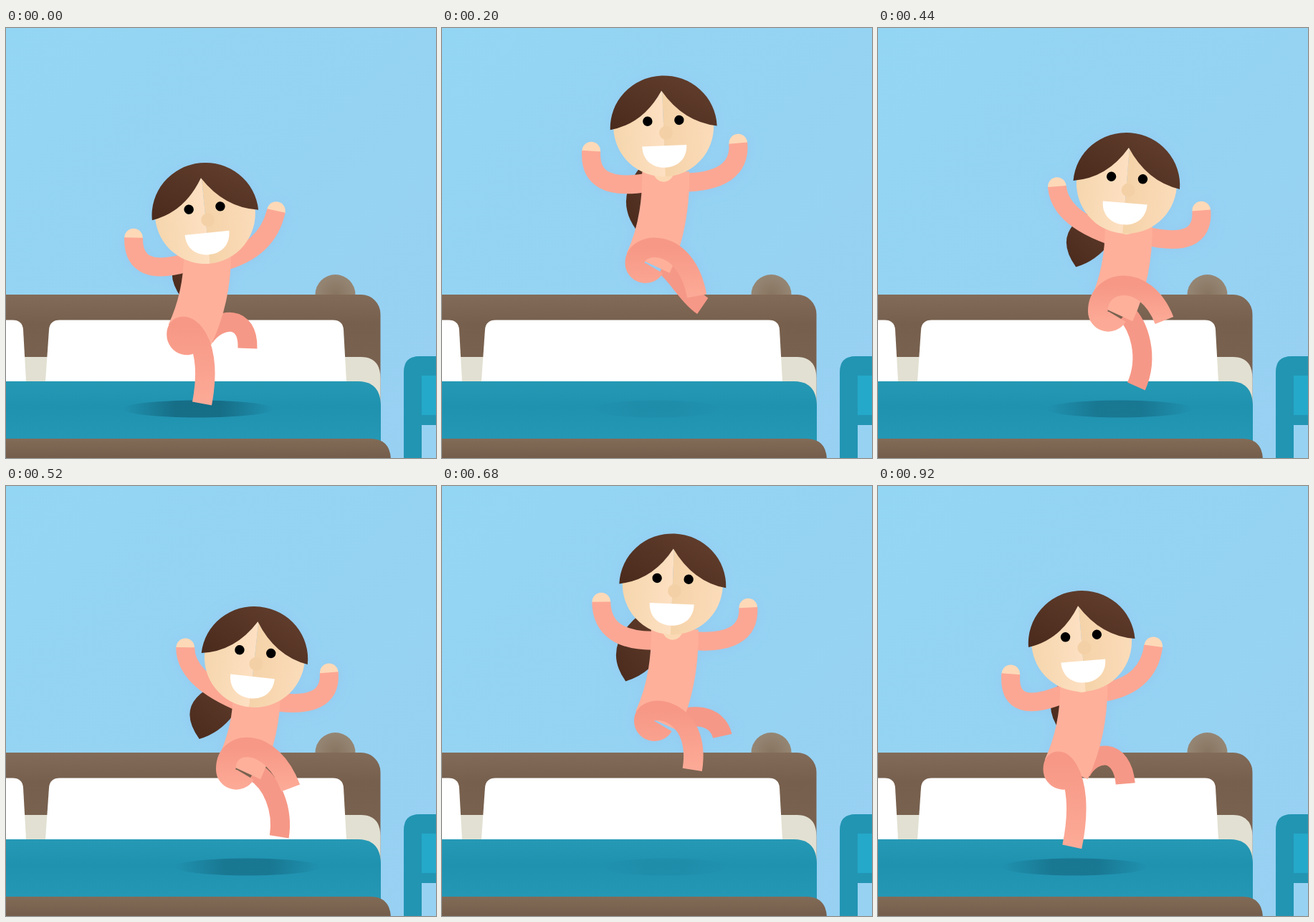
Recreate the animation shown at these times as an HTML page. Size 600 by 600 pixels, loop 960 ms.

```html
<!DOCTYPE html>
<html lang="en">
<head>
<meta charset="utf-8">
<title>Jumping on the bed</title>
<style>
  html, body { margin: 0; width: 100%; height: 100%; overflow: hidden; background: #94d5f2; }
  svg { display: block; width: 100vw; height: 100vh; }
</style>
</head>
<body>
<svg viewBox="0 0 600 600">
  <defs>
    <linearGradient id="sky" x2="1" y2="1">
      <stop stop-color="#93d6f3"/><stop offset="1" stop-color="#98d0f2"/>
    </linearGradient>
    <linearGradient id="wood" x2="0" y2="1">
      <stop stop-color="#826b58"/><stop offset=".18" stop-color="#765f4d"/><stop offset="1" stop-color="#806855"/>
    </linearGradient>
    <linearGradient id="foot" x2="0" y2="1">
      <stop stop-color="#826b56"/><stop offset="1" stop-color="#735c4a"/>
    </linearGradient>
    <radialGradient id="knob">
      <stop stop-color="#887460"/><stop offset="1" stop-color="#958674"/>
    </radialGradient>
    <linearGradient id="quilt" x2="0" y2="1">
      <stop stop-color="#2699b5"/><stop offset=".4" stop-color="#1f92b0"/><stop offset="1" stop-color="#2598b5"/>
    </linearGradient>
    <linearGradient id="shade">
      <stop stop-color="#14657d" stop-opacity="0"/><stop offset=".35" stop-color="#14657d"/>
      <stop offset=".65" stop-color="#14657d"/><stop offset="1" stop-color="#14657d" stop-opacity="0"/>
    </linearGradient>
    <linearGradient id="hair" x1="0" y1="1" x2="1" y2="0">
      <stop stop-color="#4a2a1c"/><stop offset="1" stop-color="#64402f"/>
    </linearGradient>
    <linearGradient id="cheekL">
      <stop stop-color="#f5d6ad"/><stop offset="1" stop-color="#fde0c2"/>
    </linearGradient>
    <linearGradient id="cheekR">
      <stop stop-color="#f5d3a9"/><stop offset="1" stop-color="#fbdcba"/>
    </linearGradient>
    <linearGradient id="thigh" x2="0" y2="1">
      <stop stop-color="#f79886"/><stop offset="1" stop-color="#fcaa97"/>
    </linearGradient>
    <filter id="halo" x="-30%" y="-30%" width="160%" height="160%">
      <feGaussianBlur in="SourceAlpha" stdDeviation="10" result="b"/>
      <feFlood flood-color="#8fb8f0" flood-opacity=".35"/>
      <feComposite in2="b" operator="in"/>
    </filter>
  </defs>

  <rect width="600" height="600" fill="url(#sky)"/>
  <use href="#kid" filter="url(#halo)"/>

  <g id="nightstand">
    <path d="M555 600V480Q555 458 577 458H600V600Z" fill="#2295b3"/>
    <path d="M580 485H600V540H580Z" fill="#24a9ca"/>
    <path d="M580 554H600V600H580Z" fill="#98d2f2"/>
  </g>

  <g id="bed">
    <circle cx="459.5" cy="372" r="28" fill="url(#knob)"/>
    <rect x="-40" y="372" width="562.5" height="230" rx="27" fill="url(#wood)"/>
    <path d="M0 459H495Q522 459 522.5 488V530H0Z" fill="#e2e0d2"/>
    <path d="M55 493L60 421Q61 407.500 75 407.500H456Q470 407.500 471 421L475 493Z" fill="#fff"/>
    <path d="M0 407.500H9Q23 407.500 24 421L28 493H0Z" fill="#fff"/>
    <path d="M0 493H491Q522 493 523 526V580H0Z" fill="url(#quilt)"/>
    <path d="M0 573H508Q536 573 537 602H0Z" fill="url(#foot)"/>
  </g>

  <ellipse id="shadow" cy="531.5" ry="12" fill="url(#shade)"/>

  <g id="kid" fill="none">
    <path id="tail" fill="url(#hair)"/>
    <path id="backLeg" stroke="#f69887" stroke-width="27"/>
    <circle id="handL" r="12.800" fill="#fdd9b8"/>
    <circle id="handR" r="12.800" fill="#fdd9b8"/>
    <path id="armL" stroke="#fca794" stroke-width="26"/>
    <path id="armR" stroke="#fca794" stroke-width="26"/>
    <path id="torso" stroke="#feb09b" stroke-width="66"/>
    <circle id="neck" r="14" fill="#fbd9b4"/>
    <path id="frontLeg" stroke="url(#thigh)" stroke-width="27.500"/>
    <g id="head">
      <path d="M0 -72A70 70 0 0 0 0 68Z" fill="url(#cheekL)"/>
      <path d="M0 -72A70 70 0 0 1 0 68Z" fill="url(#cheekR)"/>
      <circle cx="3" cy="7" r="9.500" fill="#f4d0a6"/>
      <path d="M-74.500 0A74.500 73 0 0 1 74.500 0Q28 -7 -1 -52Q-28 -7 -74.500 0Z" fill="url(#hair)"/>
      <circle cx="-22" cy="-10" r="6.700" fill="#000"/>
      <circle cx="22" cy="-10" r="6.700" fill="#000"/>
      <path d="M-31 25H31C31 45 17 55.500 0 55.500S-31 45 -31 25Z" fill="#fff"/>
    </g>
  </g>
</svg>
<script>
const LOOP = 960, HOP = LOOP / 2, STEP = 40;
const poseTimes = [0, 200, 360, 520, 680, 840, 920];
const hopTimes = [0, 40, 200, 360, 440];

// Offsets from the hip: front leg [bend y, knee x, y, foot x, y]
const frontLeg = [
  [-28, 41, -8, 21, 96], [-30, 56, -40, 72, 46], [-41, 55, -61, 77, 9], [-43, 49, -47, 76, 26],
  [-29, 67, -19, 53, 68], [-29, 34, 1, 11, 105], [-30, 35, -2, 12, 108]
];
// Back leg [thigh x, y, knee x, y, foot x, y]
const backLeg = [
  [46, -26, 86, -28, 84.5, 19], [40, 10, 58, 45, 80, 60], [35, 16, 53, 60, 29, 101], [50, 18, 66, 55, 60, 94],
  [50, -12, 88, -10, 95, 21], [45, -32, 83, -32, 85.5, 14.5], [42, -28, 82, -31, 86.5, 20]
];
// Offsets from the collar: arms [elbow x, y, wrist x, y]
const armL = [
  [-101, 39, -100, -19], [-105, 29, -101, -29], [-92, 4, -98, -42], [-97, -17, -96.5, -60],
  [-98.5, 17, -99.5, -39], [-106, 46, -100.5, -16], [-103.5, 49, -99, -12]
];
const armR = [
  [87, -2, 99, -56.5], [108.5, 15, 104, -40], [110, 40, 105, -18], [108, 29, 104, -25],
  [108.5, 23, 105.5, -31], [96.5, 7, 102, -45], [92.5, 6, 100, -51]
];
// Ponytail tip, from the head centre
const tailTip = [[-33, 116], [-39, 141], [-60, 122], [-77, 112], [-65.5, 133], [-39.5, 129], [-30, 123]];
const tilt = [-5.6, -2.3, 2, 6.2, 2.3, -2.3, -4.6];
const headLift = [-167, -154.4, -188.5, -195.4, -176.4];

const el = id => document.getElementById(id);
const draw = (id, d) => el(id).setAttribute('d', d);
const attrs = (id, o) => { for (const k in o) el(id).setAttribute(k, o[k]); };

// Smooth periodic curve through values at uneven times
function spline(times, vals, period, t) {
  const n = times.length;
  const time = i => times[(i + n) % n] + Math.floor(i / n) * period;
  const val = i => vals[(i + n) % n];
  const slope = i => (val(i + 1) - val(i - 1)) / (time(i + 1) - time(i - 1));
  let i = n - 1;
  while (times[i] > t) i--;
  const h = time(i + 1) - time(i), u = (t - time(i)) / h, v = 1 - u;
  return v * v * (1 + 2 * u) * val(i) + u * u * (3 - 2 * u) * val(i + 1)
    + h * u * v * (v * slope(i) - u * slope(i + 1));
}
const pose = (rows, t) => rows[0].map((_, k) => spline(poseTimes, rows.map(r => r[k]), LOOP, t));

function arm(side, rows, sign, x, collar, t) {
  const [cx, cy, ex, ey] = pose(rows, t);
  draw('arm' + side, `M${x + sign * 23} ${collar + 15}Q${x + cx} ${collar + cy} ${x + ex} ${collar + ey}`);
  attrs('hand' + side, { cx: x + ex, cy: collar + ey });
}

function render(t) {
  const hop = t % HOP;
  const low = Math.abs(hop - HOP / 2) / (HOP / 2);
  const x = 278 + 75 * (1 - Math.abs(t - HOP) / HOP);
  const hipX = x - 25.5, hipY = 325.5 + 102.5 * low ** 2.1;
  const lift = spline(hopTimes, headLift, HOP, hop);
  const headY = hipY + lift, collar = hipY + lift / 2 - 33;

  const [tx, ty] = pose(tailTip, t), px = x + tx, py = headY + ty;
  draw('tail', `M${px + 25} ${headY + 35}Q${px - 36} ${py - 50} ${px} ${py}`
    + `Q${px + 28} ${py - 8} ${px + 48} ${py - 34}L${x} ${headY + 30}Z`);

  const b = pose(backLeg, t).map((v, i) => v + (i % 2 ? hipY : hipX));
  draw('backLeg', `M${hipX + 25} ${hipY + 3}C${b.join(' ')}`);

  arm('L', armL, -1, x, collar, t);
  arm('R', armR, 1, x, collar, t);

  draw('torso', `M${x + 3} ${collar}Q${x + 4} ${hipY - 55} ${hipX + 4} ${hipY}`);
  attrs('neck', { cx: x, cy: collar });

  const [by, kx, ky, fx, fy] = pose(frontLeg, t);
  draw('frontLeg', `M${hipX + 12.5} ${hipY + 7.3}A14.5 14.5 0 0 1 ${hipX - 14.5} ${hipY}`
    + `C${hipX - 15} ${hipY + by} ${hipX + kx} ${hipY + ky} ${hipX + fx} ${hipY + fy}`);

  const angle = spline(poseTimes, tilt, LOOP, t);
  attrs('head', { transform: `translate(${x} ${headY}) rotate(${angle})` });
  attrs('shadow', { cx: x - 10, rx: 85 + 20 * low, opacity: 0.1 + 0.72 * low * low });
}

const start = performance.now();
function tick(now) {
  const t = Math.max(0, now - start) % LOOP;
  render(Math.floor(t / STEP) * STEP);
  requestAnimationFrame(tick);
}
render(0);
requestAnimationFrame(tick);
</script>
</body>
</html>
```
